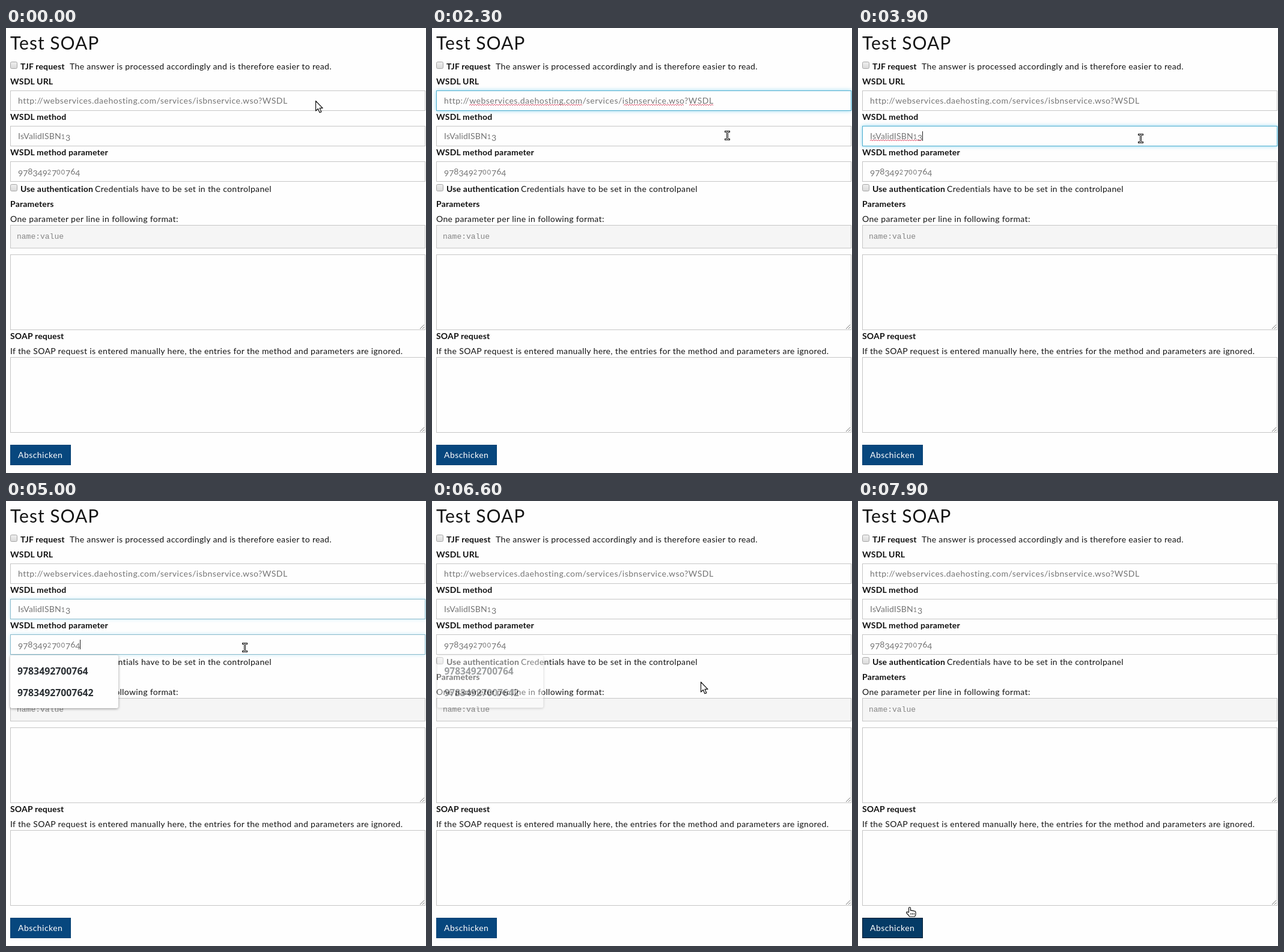
Write an HTML page that moves like this. It is 699 by 741 pixels and loops after 8 s.

```html
<!DOCTYPE html>
<html lang="en">
<head>
<meta charset="utf-8">
<title>Test SOAP</title>
<style>
html, body { margin: 0; width: 100%; height: 100%; overflow: hidden; background: #fefefe; }
svg { display: block; }
text { font: 14px Lato, "Open Sans", sans-serif; letter-spacing: .35px; fill: #151515; white-space: pre; }
.title { font-size: 30px; letter-spacing: 1px; }
.bold { font-weight: 700; letter-spacing: .18px; fill: #111; }
.value { fill: #757575; letter-spacing: .5px; }
.figures { fill: #757575; letter-spacing: .15px; }
.mono { font: 13px "Liberation Mono", monospace; letter-spacing: 0; fill: #858585; }
.hint { font: 600 15.8px "Noto Sans", sans-serif; letter-spacing: 0; fill: #2b3034; }
.send { fill: #fff; letter-spacing: .45px; }
.box { fill: #fefefe; stroke: #c6c6c6; }
.focus { fill: #fefefe; stroke: #4eafd0; filter: drop-shadow(0 0 3px rgba(80, 190, 230, .65)); }
.wave { fill: none; stroke: #d8405c; stroke-width: .9; }
.grip { fill: none; stroke: #777; }
.menu { fill: #fefefe; filter: drop-shadow(0 1px 2px rgba(0, 0, 0, .4)); }
.tick { fill: url(#grey); stroke: #a6a6a6; }
.ink { fill: #fff; stroke: #111; stroke-width: 1.2; stroke-linejoin: round; }
</style>
</head>
<body>
<svg id="stage" width="699" height="741" viewBox="0 0 699 741">
  <defs>
    <linearGradient id="grey" x2="0" y2="1"><stop stop-color="#efefef"/><stop offset="1" stop-color="#d9d9d9"/></linearGradient>
  </defs>
</svg>
<script>
const NS = 'http://www.w3.org/2000/svg', LOOP = 8000, STEP = 100;
const stage = document.getElementById('stage');

function add(tag, attrs, parent = stage) {
  const el = document.createElementNS(NS, tag);
  for (const k in attrs) el.setAttribute(k, attrs[k]);
  return parent.appendChild(el);
}
function label(x, y, cls, str, parent = stage) {
  const el = add('text', { x, y, class: cls }, parent);
  el.textContent = str;
  return el;
}
function box(x, y, w, h, cls, parent = stage) {
  return add('rect', { x: x + .5, y: y + .5, width: w - 1, height: h - 1, class: cls }, parent);
}

// Text figures: 0-2 sit at x-height, 3 4 5 7 9 hang below the baseline.
function figures(x, y, str) {
  const el = add('text', { x, y, class: 'figures' });
  let drop = 0;
  for (const ch of str) {
    const span = add('tspan', {}, el), low = '34579'.includes(ch) ? 2.6 : 0;
    span.textContent = ch;
    span.setAttribute('dy', low - drop);
    if ('012'.includes(ch)) span.setAttribute('style', 'font-size:10.8px;letter-spacing:1.1px');
    else if (/\d/.test(ch)) span.setAttribute('style', 'letter-spacing:0');
    drop = low;
  }
}
function wave(x1, x2, y, parent) {
  let d = `M${x1} ${y}`;
  for (let x = x1 + 2, up = true; x <= x2; x += 2, up = !up) d += `L${x} ${up ? y - 2 : y}`;
  add('path', { d, class: 'wave' }, parent);
}
function field(y) {
  box(7, y, 691, 34, 'box');
  return box(7, y, 691, 34, 'focus');
}
function area(y) {
  box(7, y, 691, 126, 'box');
  add('path', { d: `M689 ${y + 124}l7 -7M693 ${y + 124}l3 -3`, class: 'grip' });
}
function tick(y) {
  add('rect', { x: 7.5, y: y + .5, width: 11, height: 11, rx: 2, class: 'tick' });
}
function caret(x, y) {
  return add('rect', { x, y, width: 1, height: 16, fill: '#222' });
}

label(7, 36, 'title', 'Test SOAP');
tick(56);
label(24, 69, 'bold', 'TJF request');
label(106, 69, '', 'The answer is processed accordingly and is therefore easier to read.');
const focus = [104, 163, 222].map(field);
label(7, 94, 'bold', 'WSDL URL');
label(20, 126, 'value', 'http://webservices.daehosting.com/services/isbnservice.wso?WSDL');
label(7, 153, 'bold', 'WSDL method');
figures(20, 185, 'IsValidISBN13');
label(7, 212, 'bold', 'WSDL method parameter');
figures(20, 244, '9783492700764');
tick(260);
label(24, 273, 'bold', 'Use authentication');
label(148, 273, '', 'Credentials have to be set in the controlpanel');
label(7, 298, 'bold', 'Parameters');
label(7, 323, '', 'One parameter per line in following format:');
box(7, 328, 691, 39, 'box').style.fill = '#f5f5f5';
label(18, 351, 'mono', 'name:value');
area(377);
label(7, 518, 'bold', 'SOAP request');
label(7, 543, '', 'If the SOAP request is entered manually here, the entries for the method and parameters are ignored.');
area(548);
const button = box(7, 694, 101, 34, '');
label(20, 716, 'send', 'Abschicken');

const waves = [add('g', {}), add('g', {})];
[[62, 250], [319, 420], [428, 468]].forEach(([a, b]) => wave(a, b, 129, waves[0]));
wave(20, 107, 188, waves[1]);
const carets = [caret(468, 113), caret(107, 172), caret(123, 231)];

const menu = add('g', {});
add('rect', { x: 7, y: 257, width: 180, height: 88, rx: 3, class: 'menu' }, menu);
label(19, 289, 'hint', '9783492700764', menu);
label(19, 325, 'hint', '97834927007642', menu);

const beam = 'M-3 -6.5H-1.5Q0 -6.5 0 -5Q0 -6.5 1.5 -6.5H3M0 -5V5M-3 6.5H-1.5Q0 6.5 0 5Q0 6.5 1.5 6.5H3';
const arrow = add('path', { class: 'ink', d: 'M.5 .5V17L4.3 13.4L7 19.8L9.8 18.6L7.1 12.4H12Z' });
const bar = add('g', { fill: 'none', 'stroke-linecap': 'square' });
add('path', { d: beam, stroke: '#111', 'stroke-width': 3 }, bar);
add('path', { d: beam, stroke: '#fff', 'stroke-width': 1 }, bar);
const hand = add('g', {});
add('path', { class: 'ink', d: 'M-1.5 8V1Q-1.5 -.5 0 -.5T1.5 1V5Q3 4 4.3 5.4Q6 4.6 7 6Q10 5.4 10 8V11Q10 13 8.5 15H-.5Q-2 12 -5 9.5Q-6 7.5 -4 7.2Z' }, hand);
add('path', { fill: 'none', stroke: '#111', d: 'M2 9v3M4.6 9v3M7.2 9v3' }, hand);

// Pointer stops: time, x, y; it rests between equal places.
const path = [
  [0, 515, 121], [100, 515, 121], [200, 511.5, 126], [1200, 511.5, 126], [1300, 510.5, 126],
  [1500, 510.5, 126], [2100, 491.5, 179], [3700, 491.5, 179], [3900, 470.5, 184], [4000, 470.5, 184],
  [4400, 402.5, 231], [4500, 402.5, 231], [4600, 397.5, 244], [5800, 397.5, 244], [6200, 434, 291],
  [6300, 434, 291], [6400, 447, 301], [7100, 447, 301], [7900, 86, 677]
];
const clamp = v => Math.max(0, Math.min(1, v));
const within = (t, a, b) => t >= a && t < b;
const glow = (t, a, b) => clamp((t - a + 100) / 200) * clamp((b + 100 - t) / 200);
const show = (el, on) => el.setAttribute('visibility', on ? 'visible' : 'hidden');

function pointer(t) {
  const i = path.findIndex(p => p[0] > t);
  if (i < 0) return path[path.length - 1].slice(1);
  const [t0, x0, y0] = path[i - 1], [t1, x1, y1] = path[i];
  const u = (t - t0) / (t1 - t0), e = u * u * (3 - 2 * u);
  return [x0 + (x1 - x0) * e, y0 + (y1 - y0) * e];
}

function draw(time) {
  const t = Math.floor(time % LOOP / STEP) * STEP;
  [[600, 2500], [2500, 5000], [5000, 6500]].forEach(([a, b], i) => focus[i].setAttribute('opacity', glow(t, a, b)));
  show(waves[0], within(t, 600, 2500));
  show(waves[1], within(t, 2500, 5000));
  show(carets[0], within(t, 600, 1100) || within(t, 1700, 2300));
  show(carets[1], within(t, 2500, 3400) || within(t, 3600, 4200) || within(t, 4800, 5000));
  show(carets[2], within(t, 5000, 5900));

  const fade = t < 6700 ? 1 - .54 * clamp((t - 6400) / 200) : .05;
  const k = 1 - .036 * (1 - fade);
  show(menu, within(t, 5000, 7000));
  menu.setAttribute('opacity', fade);
  menu.setAttribute('transform', `translate(97 301) scale(${k}) translate(-97 -301)`);

  const hover = t >= 7800;
  button.setAttribute('fill', hover ? '#053b66' : '#07477e');
  button.setAttribute('stroke', hover ? '#021a2e' : '#064172');

  const [x, y] = pointer(t);
  const typing = within(t, 200, 6000) || (t > 7100 && (within(y, 377, 503) || within(y, 548, 674)));
  [[arrow, !typing && !hover], [bar, typing && !hover], [hand, hover]].forEach(([el, on]) => {
    show(el, on);
    el.setAttribute('transform', `translate(${x} ${y})`);
  });
}
function run(now) {
  draw(now);
  requestAnimationFrame(run);
}
draw(0);
requestAnimationFrame(run);
</script>
</body>
</html>
```
